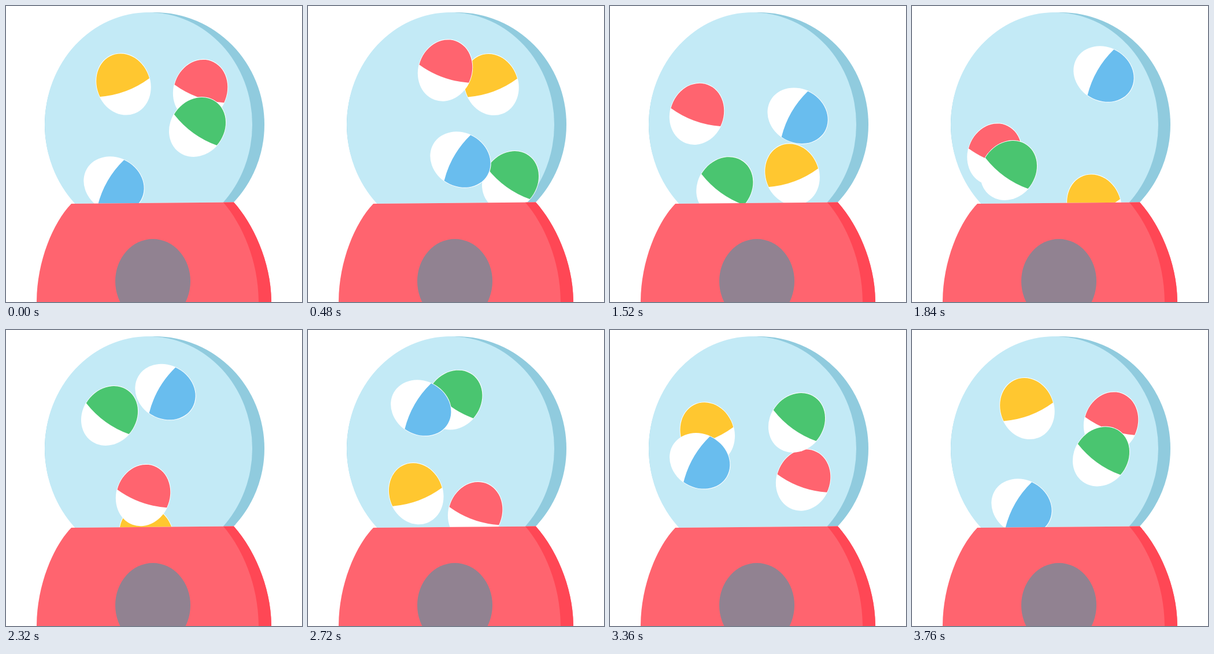
Recreate the animation shown at these times as an HTML page. Size 512 by 512 pixels, loop 3.84 s.

```html
<!DOCTYPE html>
<html>
<head>
<meta charset="utf-8">
<title>Capsule machine</title>
<style>
  html, body { margin: 0; width: 100%; height: 100%; overflow: hidden; background: #fff; }
  svg { display: block; width: 100%; height: 100%; }
</style>
</head>
<body>
<svg viewBox="0 0 512 512">
  <ellipse cx="257" cy="205" rx="190" ry="194" fill="#90cbde"/>
  <ellipse cx="246.5" cy="205" rx="179.5" ry="194" fill="#c3eaf6"/>
  <g id="balls"></g>
  <path d="M0 343 L113 342 L394 339.5 L512 339 V512 H0Z" fill="#fff"/>
  <path d="M113 342 L394 339.5 C427 376 459 443 459 512 H53 C53 443 81 375 113 342Z" fill="#ff646f"/>
  <path d="M376 339.7 L394 339.5 C427 376 459 443 459 512 H437 C437 442 409 378 376 339.7Z" fill="#ff4755"/>
  <ellipse cx="254" cy="476" rx="65" ry="73" fill="#918291"/>
</svg>
<script>
const STEP = 80, STEPS = 48;

// Every ball passes its key points at the same steps, on an open path.
const keySteps = [0, 6, 14, 23, 29, 38, 47];
const balls = [
  { color: '#ffc730', angle: -20.5, path: '203,135 317,135.5 303.5,215.5 315,344 243,356 159,218.5 199,135.5' },
  { color: '#ff646f', angle: 20, path: '336.5,145.5 237.5,111 184.5,104.5 143,256 237.5,285.5 319.5,315.5 344.5,160' },
  { color: '#4ac570', angle: 36, path: '331.5,209 350.5,302 253.5,320 167.5,284 179.5,148 307,127 327.5,218.5' },
  { color: '#69bdee', angle: 120, path: '187,309 264,266 301,278 332,118 276,107.5 149,172 190,306' },
];

const group = document.getElementById('balls');
for (const ball of balls) {
  const points = ball.path.split(' ').map(point => point.split(',').map(Number));
  ball.xs = points.map(point => point[0]);
  ball.ys = points.map(point => point[1]);
  ball.node = document.createElementNS('http://www.w3.org/2000/svg', 'g');
  ball.node.innerHTML = `<ellipse rx="46.7" ry="54.5" fill="#fff"/>
    <path d="M-45.6 6.5 A45.9 53.8 0 1 1 45.6 6.5 Q0 19.5 -45.6 6.5Z" fill="${ball.color}"/>`;
  group.append(ball.node);
}

function slope(values, i) {
  const a = Math.max(i - 1, 0), b = Math.min(i + 1, values.length - 1);
  return (values[b] - values[a]) / (keySteps[b] - keySteps[a]);
}

// Smooth cubic Hermite curve through the key values.
function interpolate(values, step) {
  const i = Math.max(keySteps.findIndex(key => key >= step), 1) - 1;
  const span = keySteps[i + 1] - keySteps[i];
  const u = (step - keySteps[i]) / span, v = 1 - u;
  return values[i] * v * v * (1 + 2 * u) + values[i + 1] * u * u * (1 + 2 * v)
    + span * u * v * (slope(values, i) * v - slope(values, i + 1) * u);
}

function draw() {
  const step = Math.floor(performance.now() / STEP) % STEPS;
  for (const { node, xs, ys, angle } of balls) {
    const x = interpolate(xs, step), y = interpolate(ys, step);
    node.setAttribute('transform', `translate(${x} ${y}) rotate(${angle})`);
  }
  requestAnimationFrame(draw);
}
draw();
</script>
</body>
</html>
```
